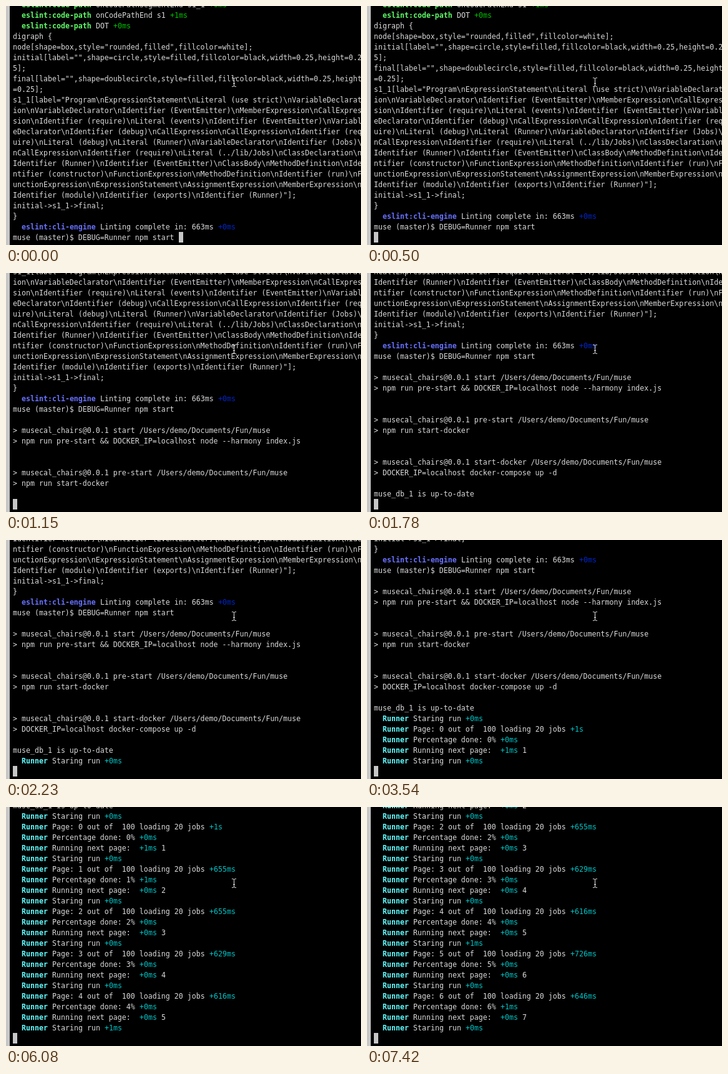
An HTML page with a canvas that plays this animation: 569 by 384 pixels, repeating every 8000 ms.

```html
<!DOCTYPE html>
<html lang="en">
<head>
<meta charset="utf-8">
<title>Terminal session</title>
<style>
  html, body { margin: 0; width: 100%; height: 100%; overflow: hidden; background: #000; }
  canvas { display: block; }
</style>
</head>
<body>
<canvas id="stage" width="569" height="384"></canvas>
<script>
const ctx = document.getElementById('stage').getContext('2d');
const LOOP = 8000;
const LEFT = 11, CHAR = 7, ROW = 17, BOTTOM_TOP = 363, BASELINE = 13;
const FONT = '11.627px "DejaVu Sans Mono", monospace';
const TEXT = '#dadada', GREY = '#c7c7c7';

// Debug label -> [label colour, elapsed-time colour]
const LABELS = {
  'eslint:code-path': ['#5ffa68', '#00c200'],
  'eslint:cli-engine': ['#6871ff', '#0225c7'],
  'Runner': ['#60fdff', '#00c5c7']
};

const session = String.raw`  eslint:code-path onCodePathSegmentEnd s1_1 +0ms
  eslint:code-path onCodePathEnd s1 +1ms
  eslint:code-path DOT +0ms
digraph {
node[shape=box,style="rounded,filled",fillcolor=white];
initial[label="",shape=circle,style=filled,fillcolor=black,width=0.25,height=0.25];
final[label="",shape=doublecircle,style=filled,fillcolor=black,width=0.25,height=0.25];
s1_1[label="Program\nExpressionStatement\nLiteral (use strict)\nVariableDeclaration\nVariableDeclarator\nIdentifier (EventEmitter)\nMemberExpression\nCallExpression\nIdentifier (require)\nLiteral (events)\nIdentifier (EventEmitter)\nVariableDeclarator\nIdentifier (debug)\nCallExpression\nCallExpression\nIdentifier (require)\nLiteral (debug)\nLiteral (Runner)\nVariableDeclarator\nIdentifier (Jobs)\nCallExpression\nIdentifier (require)\nLiteral (../lib/Jobs)\nClassDeclaration\nIdentifier (Runner)\nIdentifier (EventEmitter)\nClassBody\nMethodDefinition\nIdentifier (constructor)\nFunctionExpression\nMethodDefinition\nIdentifier (run)\nFunctionExpression\nExpressionStatement\nAssignmentExpression\nMemberExpression\nIdentifier (module)\nIdentifier (exports)\nIdentifier (Runner)"];
initial->s1_1->final;
}
  eslint:cli-engine Linting complete in: 663ms +0ms
muse (master)$ DEBUG=Runner npm start

> musecal_chairs@0.0.1 start /Users/demo/Documents/Fun/muse
> npm run pre-start && DOCKER_IP=localhost node --harmony index.js


> musecal_chairs@0.0.1 pre-start /Users/demo/Documents/Fun/muse
> npm run start-docker


> musecal_chairs@0.0.1 start-docker /Users/demo/Documents/Fun/muse
> DOCKER_IP=localhost docker-compose up -d

muse_db_1 is up-to-date
  Runner Staring run +0ms`;

// The terminal wraps at 80 columns
const lines = session.split('\n').flatMap(line => line.match(/.{1,80}/g) || ['']);
const promptRow = lines.findIndex(line => line.startsWith('muse (master)'));
const runRow = lines.length;

const loadTimes = ['1s', '655ms', '655ms', '629ms', '616ms', '726ms', '646ms'];
loadTimes.forEach((load, page) => {
  const ms = slow => (slow ? '+1ms' : '+0ms');
  lines.push(
    `  Runner Page: ${page} out of  100 loading 20 jobs +${load}`,
    `  Runner Percentage done: ${page}% ${ms(page === 1 || page === 6)}`,
    `  Runner Running next page:  ${ms(page === 0)} ${page + 1}`,
    `  Runner Staring run ${ms(page === 4)}`
  );
});

// [start time, row of the terminal cursor]
const steps = [
  [0, promptRow], [500, promptRow + 1], [860, promptRow + 5], [1150, promptRow + 9],
  [1480, promptRow + 13], [1780, promptRow + 14], [2230, runRow],
  ...[3540, 4170, 4820, 5480, 6080, 6760, 7420].map((time, page) => [time, runRow + 4 * (page + 1)])
];

function write(text, column, y, color, bold) {
  ctx.font = (bold ? 'bold ' : '') + FONT;
  ctx.fillStyle = color;
  ctx.fillText(text, LEFT + column * CHAR, y);
}

function drawLine(line, y) {
  const parts = line.match(/^  (\S+)(.*?)(\+\d+m?s)(.*)$/);
  if (!parts) return write(line, 0, y, TEXT);
  const [, label, message, elapsed, rest] = parts;
  const [labelColor, timeColor] = LABELS[label];
  let column = 2;
  const put = (text, color, bold) => {
    write(text, column, y, color, bold);
    column += text.length;
  };
  put(label, labelColor, true);
  put(message, TEXT);
  put(elapsed, timeColor);
  put(rest, TEXT);
}

function drawPointer() {
  ctx.strokeStyle = '#e4e4e4';
  ctx.lineWidth = 1;
  ctx.stroke(new Path2D('M362 115.5h1.5q2 0 2 2q0-2 2-2h1.5M365.5 117.5v10M362 129.5h1.5q2 0 2-2q0 2 2 2h1.5M364 124.5h3'));
}

function draw(time) {
  const cursorRow = steps.filter(([start]) => start <= time).pop()[1];
  const typing = cursorRow === promptRow;
  ctx.fillStyle = '#000';
  ctx.fillRect(0, 0, 569, 384);
  ctx.fillStyle = GREY;
  ctx.fillRect(0, 0, 6, 384);

  const visible = typing ? cursorRow + 1 : cursorRow;
  for (let row = Math.max(0, cursorRow - 22); row < visible; row++) {
    drawLine(lines[row], BOTTOM_TOP - (cursorRow - row) * ROW + BASELINE);
  }
  const cursorColumn = typing ? lines[promptRow].length + 1 : 0;
  ctx.fillStyle = GREY;
  ctx.fillRect(LEFT + cursorColumn * CHAR, BOTTOM_TOP, CHAR, ROW);
  drawPointer();
}

function tick() {
  draw(performance.now() % LOOP);
  requestAnimationFrame(tick);
}
tick();
</script>
</body>
</html>
```
